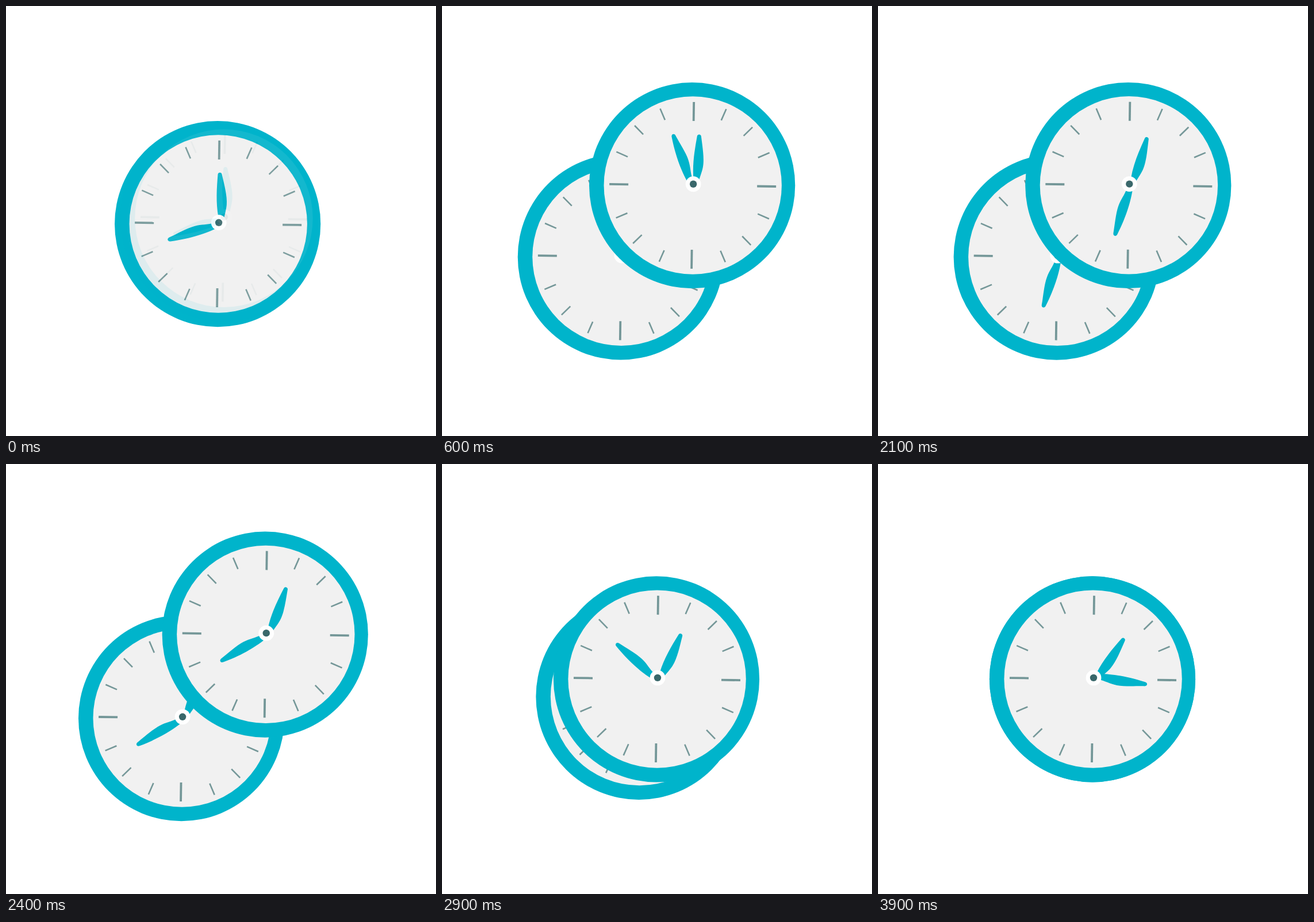
An HTML page that plays this animation: 748 px wide and 748 px high, repeating every 4000 ms.

```html
<!DOCTYPE html>
<html lang="en">
<head>
<meta charset="utf-8">
<title>Clocks</title>
<style>
  html, body { margin: 0; height: 100%; overflow: hidden; background: #fff; }
  svg { display: block; width: 100%; height: 100%; }
</style>
</head>
<body>
<svg viewBox="0 0 748 748">
  <defs>
    <!-- The hub is the origin; rim, face and ticks sit slightly off it. -->
    <g id="clock">
      <circle cx="-2" cy="2.4" r="179.1" fill="#00b4cb"/>
      <circle cx="-.9" cy="2.2" r="154.7" fill="#f1f1f1"/>
      <g id="ticks" transform="translate(-1 2.2)" stroke="#749798"/>
      <g fill="#00b4cb">
        <path id="hour" d="M-1-10C-6-35-5-60-3.5-84C-3-88 3-88 3.5-84C8-66 14-46 13-31C12.5-24 11-18 9-8Z"/>
        <path id="minute" d="M-8-8C-10-25-11-52-3.5-90C-2.7-95 3-95 3.7-90C5-76 9-56 8-42C7-28 3-22 2-8Z"/>
      </g>
      <circle r="13.4" fill="#fff"/>
      <circle r="6.2" fill="#3a686b"/>
    </g>
    <clipPath id="disc"><circle id="hole" r="179.1"/></clipPath>
  </defs>
  <use id="under" href="#clock"/>
  <use id="back" href="#clock"/>
  <g id="mask"><use id="over" href="#clock"/></g>
</svg>
<script>
  const LOOP = 4000, STEP = 100;
  const HUB = { x: 375, y: 371.9 };
  const REST = 62.3, PEAK = 94;
  const TICKS = [.8, 23.7, 45.8, 67]; // angles within one quarter

  // [time, hour angle, minute angle]
  const HANDS = [
    [0, 1.3, 251], [600, 7, 337.6], [1300, 13.8, 440.8], [2100, 21, 555.7],
    [2700, 26.6, 640.6], [3200, 31.1, 713], [3900, 37.9, 816.9]
  ];

  const $ = id => document.getElementById(id);
  const clamp = v => Math.min(1, Math.max(0, v));
  const span = (t, from, to) => clamp((t - from) / (to - from));

  for (let i = 0; i < 16; i++) {
    const major = i % 4 === 0;
    const tick = document.createElementNS('http://www.w3.org/2000/svg', 'line');
    tick.setAttribute('y1', -145);
    tick.setAttribute('y2', major ? -112 : -123.5);
    tick.setAttribute('stroke-width', major ? 3.8 : 2.6);
    tick.setAttribute('transform', `rotate(${(i >> 2) * 90 + TICKS[i % 4]})`);
    $('ticks').append(tick);
  }

  const enter = t => Math.sin(Math.PI / 2 * span(t, -33, 630));

  // Diagonal distance from the middle: slide apart, swing wider, then merge.
  function spread(t, delay) {
    const s = t - delay;
    if (t < 2100) return REST * enter(t);
    if (s < 2500) return REST + (PEAK - REST) * span(s, 2100, 2500) ** 2.5;
    return PEAK * Math.cos(Math.PI / 2 * span(s, 2500, 2880));
  }

  function angle(t, col) {
    const i = Math.max(1, HANDS.findIndex(k => k[0] >= t));
    const a = HANDS[i - 1], b = HANDS[i];
    return a[col] + (b[col] - a[col]) * span(t, a[0], b[0]);
  }

  const place = (id, d) =>
    $(id).setAttribute('transform', `translate(${HUB.x + d} ${HUB.y - d})`);

  function draw(t) {
    $('hour').setAttribute('transform', `rotate(${angle(t, 1)})`);
    $('minute').setAttribute('transform', `rotate(${angle(t, 2)})`);

    const front = spread(t, 0), back = -spread(t, 100), fade = enter(t);
    place('under', front);
    place('over', front);
    place('back', back);
    $('hole').setAttribute('cx', HUB.x - 2 + back);
    $('hole').setAttribute('cy', HUB.y + 2.4 - back);

    // Fades over the other clock, but appears at once on the bare ground.
    const fading = fade < .99;
    $('over').setAttribute('opacity', fading ? fade : 1);
    $('mask').setAttribute('clip-path', fading ? 'url(#disc)' : 'none');
    $('under').setAttribute('visibility', fading && fade >= .5 ? 'visible' : 'hidden');
  }

  const start = performance.now();
  function tick() {
    const t = (performance.now() - start) % LOOP;
    draw(Math.floor(t / STEP) * STEP);
    requestAnimationFrame(tick);
  }
  tick();
</script>
</body>
</html>
```
